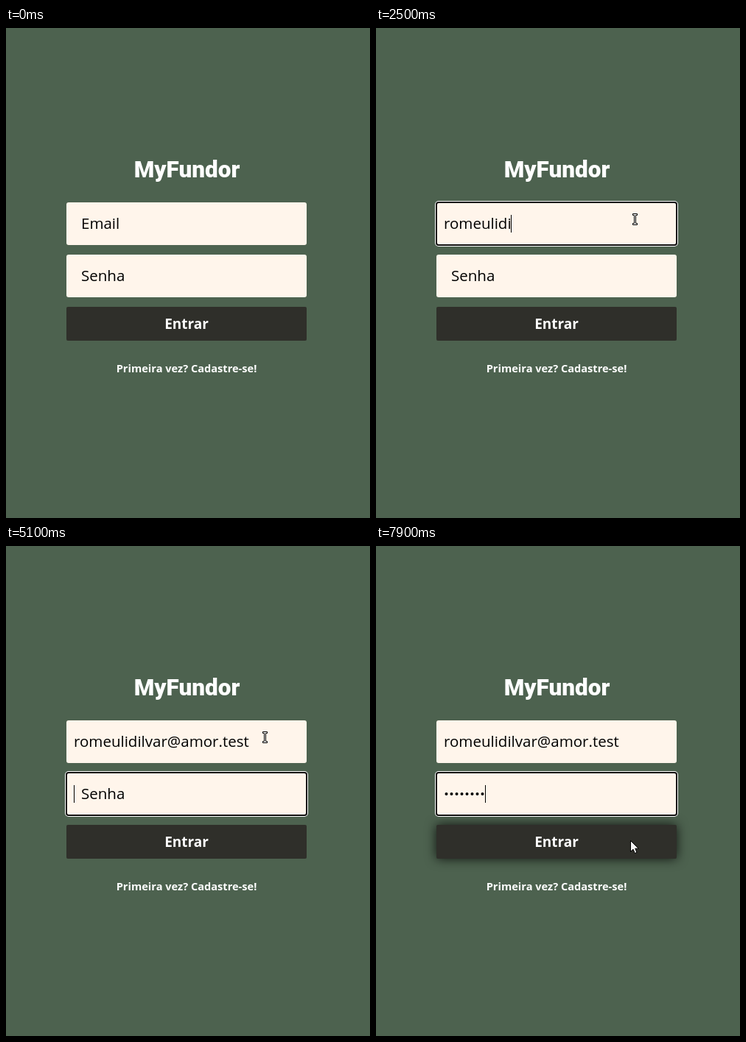
Write an HTML page with a canvas that moves like this. It is 494 px wide and 666 px high and loops after 8000 ms.

```html
<!DOCTYPE html>
<html lang="pt-BR">
<head>
<meta charset="utf-8">
<title>Login</title>
<style>
  html, body { margin: 0; width: 100%; height: 100%; overflow: hidden; background: #4d624f; }
  canvas { display: block; }
</style>
</head>
<body>
<canvas width="494" height="666"></canvas>
<script>
const ctx = document.querySelector('canvas').getContext('2d');
const LOOP = 8000, STEP = 100;
const INK = '#000', CREAM = '#fff5eb', BUTTON = '#2f2f2a';
const BODY_FONT = '400 20.5px "Open Sans", "Noto Sans", sans-serif';
const BOLD = '"Open Sans", "Noto Sans", sans-serif';

const FIELD_X = 82, FIELD_W = 326, FIELD_H = 58, TEXT_X = 92, DOT_PITCH = 7;
const EMAIL_Y = 237, PASSWORD_Y = 308, BUTTON_Y = 379;

const EMAIL = 'romeulidilvar@amor.test';
const EMAIL_KEYS = [1300, 1500, 1700, 1900, 2000, 2200, 2300, 2400, 2500, 2700, 2900, 3000, 3100,
  3400, 3800, 4000, 4100, 4200, 4400, 4500, 4600, 4800, 4900];
const PASSWORD_KEYS = [5700, 5900, 6000, 6200, 6300, 6400, 6600, 6700];
const EMAIL_FOCUS = 900, PASSWORD_FOCUS = 5100;

const typedCount = (keys, t) => keys.filter(k => k <= t).length;
const clamp = v => Math.min(1, Math.max(0, v));
const mix = (a, b, k) => a + (b - a) * k;

function box(x, y, w, h, r, color) {
  ctx.fillStyle = color;
  ctx.beginPath();
  ctx.roundRect(x, y, w, h, r);
  ctx.fill();
}

function text(str, x, y, font, color, align = 'left') {
  ctx.font = font;
  ctx.fillStyle = color;
  ctx.textAlign = align;
  ctx.fillText(str, x, y);
}

function field(y, placeholder, empty, focused) {
  if (focused) {
    box(FIELD_X - 2, y - 2, FIELD_W + 4, FIELD_H + 4, 5, '#fff');
    box(FIELD_X - 1, y - 1, FIELD_W + 2, FIELD_H + 2, 4, '#101010');
    box(FIELD_X + 1, y + 1, FIELD_W - 2, FIELD_H - 2, 2, CREAM);
  } else {
    box(FIELD_X, y, FIELD_W, FIELD_H, 3, CREAM);
  }
  if (empty) text(placeholder, 102, y + 36, BODY_FONT, INK);
}

function caret(x, fieldY) {
  ctx.fillStyle = INK;
  ctx.fillRect(Math.floor(x), fieldY + 17, 1, 24);
}

function pointerAt(t) {
  if (t < 200) return null;
  if (t < 7500) {
    const k = 1 - (1 - clamp((t - 200) / 500)) ** 2;
    return { x: mix(478, 351, k), y: mix(290, 260, k) };
  }
  const k = clamp((t - 7400) / 500), s = k * k * (3 - 2 * k);
  return { x: mix(351, 345, s), y: mix(260, 400, s) };
}

const inside = (p, y, h) => p && p.x >= FIELD_X && p.x < FIELD_X + FIELD_W && p.y >= y && p.y < y + h;

const arrowShape = new Path2D('M.5 .5V15.5L4 12.2L6.3 17.6L9 16.5L6.8 11.2H11.3Z');
const beamShape = new Path2D('M-2.5 -7.5H3.5V-5.5H1.5V5.5H3.5V7.5H-2.5V5.5H-.5V-5.5H-2.5Z');

function pointer(p) {
  const overField = inside(p, EMAIL_Y, FIELD_H) || inside(p, PASSWORD_Y, FIELD_H);
  const shape = overField ? beamShape : arrowShape;
  ctx.save();
  ctx.translate(Math.round(p.x), Math.round(p.y));
  ctx.lineWidth = 1;
  ctx.fillStyle = '#f4f4f4';
  ctx.strokeStyle = '#000';
  ctx.fill(shape);
  ctx.stroke(shape);
  ctx.restore();
}

function draw(t) {
  const p = pointerAt(t);
  const email = EMAIL.slice(0, typedCount(EMAIL_KEYS, t));
  const dots = typedCount(PASSWORD_KEYS, t);
  const emailFocused = t >= EMAIL_FOCUS && t < PASSWORD_FOCUS;
  const passwordFocused = t >= PASSWORD_FOCUS;
  const caretHidden = t >= 7300 && t < 7800;

  ctx.fillStyle = '#4d624f';
  ctx.fillRect(0, 0, 494, 666);
  text('MyFundor', 245.5, 202.5, '900 31.5px Roboto, Inter, sans-serif', '#fff', 'center');

  field(EMAIL_Y, 'Email', !email, emailFocused);
  text(email, TEXT_X, EMAIL_Y + 36, BODY_FONT, INK);
  if (emailFocused) caret(TEXT_X + ctx.measureText(email).width, EMAIL_Y);

  ctx.save();
  if (inside(p, BUTTON_Y, 46)) {
    ctx.shadowColor = 'rgba(0,0,0,.8)';
    ctx.shadowBlur = 15;
  }
  box(FIELD_X, BUTTON_Y, FIELD_W, 46, 2, BUTTON);
  ctx.restore();
  text('Entrar', 245, 409, '700 19px ' + BOLD, '#fff', 'center');

  field(PASSWORD_Y, 'Senha', !dots, passwordFocused);
  for (let i = 0; i < dots; i++) box(TEXT_X + 1.5 + i * DOT_PITCH, PASSWORD_Y + 27, 4, 4, 2, INK);
  if (passwordFocused && !caretHidden) caret(TEXT_X + dots * DOT_PITCH, PASSWORD_Y);

  text('Primeira vez? Cadastre-se!', 245, 468, '700 14.6px ' + BOLD, '#fff', 'center');
  if (p) pointer(p);
}

function tick(now) {
  draw(Math.floor((now % LOOP) / STEP) * STEP);
  requestAnimationFrame(tick);
}
requestAnimationFrame(tick);
</script>
</body>
</html>
```
